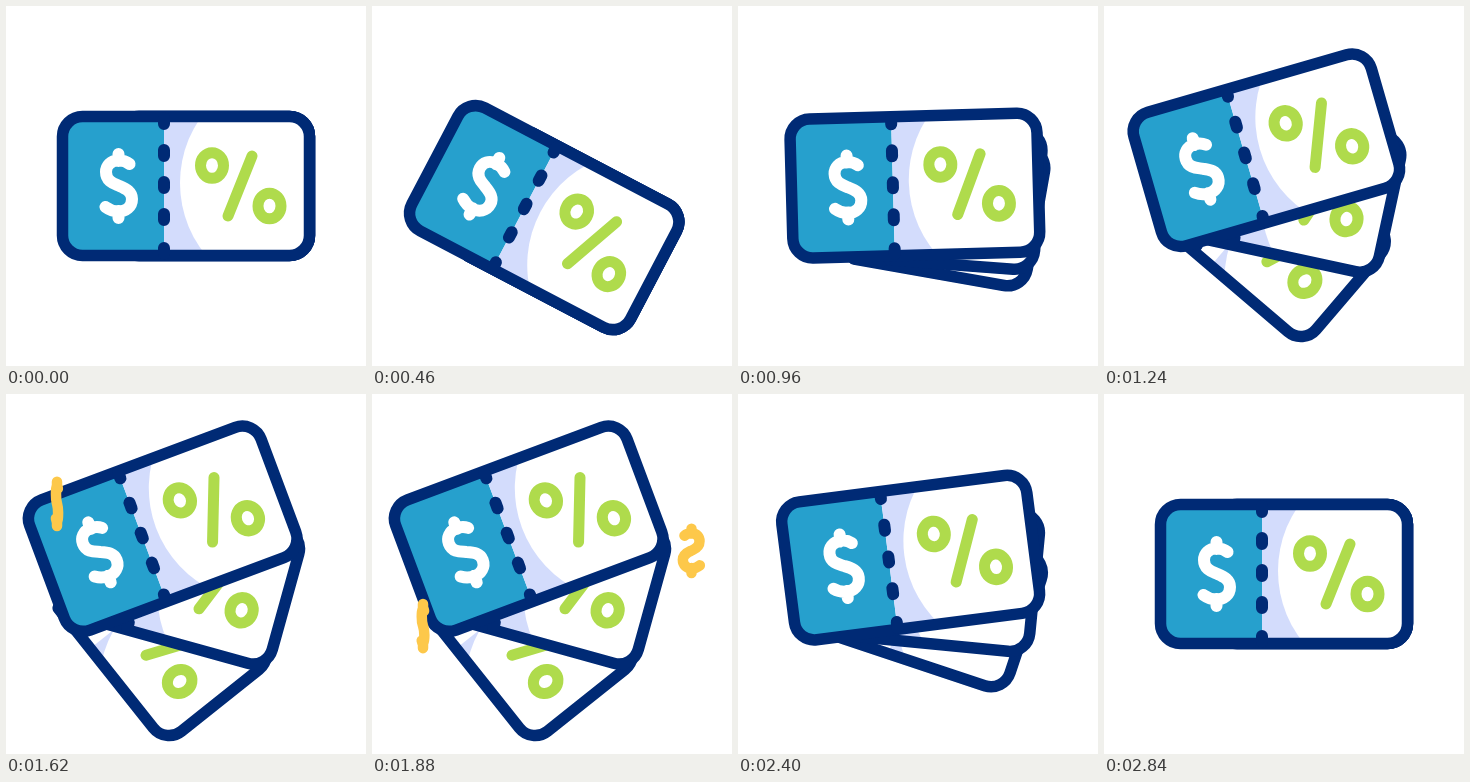
Animation, 360 px wide and 360 px high, one loop 2860 ms. Source, as an HTML page with a canvas:

```html
<!DOCTYPE html>
<html>
<head>
<meta charset="utf-8">
<style>
html, body { margin: 0; height: 100%; overflow: hidden; background: #fff; }
canvas { display: block; }
</style>
</head>
<body>
<canvas id="stage" width="360" height="360"></canvas>
<script>
const LOOP = 2860;
const NAVY = '#002a75', BLUE = '#26a0cd', LAVENDER = '#d3dcfc', GREEN = '#afdb4c', YELLOW = '#fdc84a';
const ctx = document.getElementById('stage').getContext('2d');

const dollar = new Path2D(
  'M11-22Q6-26 0-25.5C-8-25.5-12.5-20-12.5-14C-12.5-4-3-2 1 0C8 3 13.5 6 13.5 13' +
  'C13.5 21 7 25.5 0 25.5C-5 25.5-9 24-13 21M0-32V-25M0 25V32');

const percent = new Path2D('M66-30L42 30');
for (const [x, y] of [[26, -20.5], [83.5, 20]]) {
  percent.moveTo(x + 11.5, y);
  percent.ellipse(x, y, 11.5, 12.8, 0, 0, 2 * Math.PI);
}

const perforation = new Path2D();
for (const y of [-65, -33, -1, 31, 65]) {
  perforation.moveTo(-22, y - 3);
  perforation.lineTo(-22, y + 3);
}

const card = new Path2D();
card.roundRect(-123.5, -69.5, 247, 139, 20);

// Tickets at the back lack most of their left part
const stub = new Path2D();
stub.roundRect(-57, -76, 190, 152, 10);

// Smooth step from 0 to 1 between two times
function ease(t, from, to) {
  const u = Math.min(1, Math.max(0, (t - from) / (to - from)));
  return (1 - Math.cos(Math.PI * u)) / 2;
}

function line(path, color, width) {
  ctx.strokeStyle = color;
  ctx.lineWidth = width;
  ctx.stroke(path);
}

// The ticket turns about the middle of its dollar sign
function ticket(x, y, degrees, { back = false, bandStart = -22 } = {}) {
  ctx.save();
  ctx.translate(x, y);
  ctx.rotate(degrees * Math.PI / 180);
  ctx.translate(68, 0);
  if (back) ctx.clip(stub);
  ctx.save();
  ctx.clip(card);
  ctx.fillStyle = '#fff';
  ctx.fillRect(-124, -70, 248, 140);
  ctx.fillStyle = BLUE;
  ctx.fillRect(-124, -70, 102, 140);
  ctx.fillStyle = LAVENDER;
  ctx.fillRect(bandStart, -70, 60, 140);
  ctx.fillStyle = '#fff';
  ctx.beginPath();
  ctx.arc(108, -3, 114, 0, 2 * Math.PI);
  ctx.fill();
  ctx.restore();
  line(card, NAVY, 11.5);
  line(perforation, NAVY, 12);
  line(percent, GREEN, 11);
  ctx.translate(-67.5, 0);
  line(dollar, '#fff', 12);
  ctx.restore();
}

// A falling dollar sign that spins about its vertical axis
function coin(t, x, start, end) {
  if (t < start || t > end) return;
  const age = t - start;
  const spin = Math.cos(Math.PI * (age - 10) / 240);
  const shape = new Path2D();
  shape.addPath(dollar, new DOMMatrix([0.69 * spin, 0, 0, 0.69, x, 53 + 0.47 * age]));
  ctx.globalAlpha = Math.min(1, age / 60, (end - t) / 30);
  line(shape, YELLOW, 10.5);
  ctx.globalAlpha = 1;
}

function draw(t) {
  const swing = 28.6 * (ease(t, 0, 520) - ease(t, 540, 1040));
  const fan = ease(t, 790, 1440) - ease(t, 1880, 2760);
  const dip = 5 * (ease(t, 700, 940) - ease(t, 980, 1220));
  const x = 112 - 17 * fan;
  const y = 180 - 23.5 * fan + dip;

  ctx.fillStyle = '#fff';
  ctx.fillRect(0, 0, 360, 360);
  ctx.lineCap = ctx.lineJoin = 'round';
  ticket(x, y, swing + 51.5 * fan, { back: true, bandStart: 2 });
  ticket(x, y, swing + 15.5 * fan, { back: true });
  ticket(x - 2 * fan, y + 2 * fan, swing - 20.5 * fan);
  coin(t, 51, 1500, 2110);
  coin(t, 319.5, 1660, 2205);
}

const begin = performance.now();
function frame() {
  draw((performance.now() - begin) % LOOP);
  requestAnimationFrame(frame);
}
frame();
</script>
</body>
</html>
```
